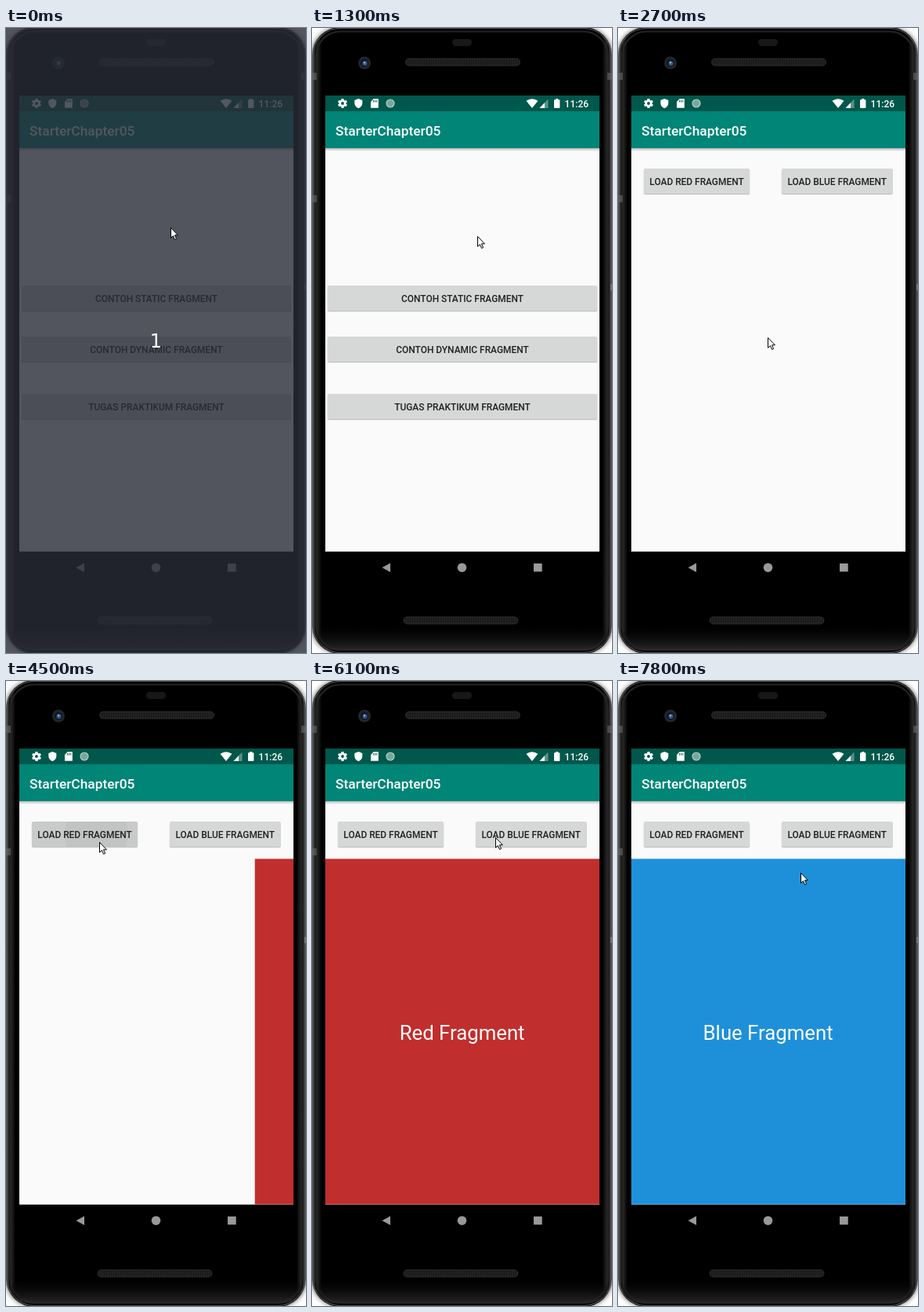
Animation of 383x796 px, one loop 8 s. Source, as an HTML page:

```html
<!DOCTYPE html>
<html lang="id">
<head>
<meta charset="utf-8">
<title>Fragment demo</title>
<style>
  html, body { margin: 0; width: 100%; height: 100%; overflow: hidden; background: #fff; }
  svg { display: block; width: 383px; height: 796px; font-family: Roboto, sans-serif; }
  text { white-space: pre; }
  .label { font-size: 11.92px; font-weight: 500; fill: #212121; text-anchor: middle; }
  .big { font-size: 25.75px; fill: #fff; text-anchor: middle; }
  .title { font-size: 17.35px; font-weight: 500; fill: #fff; }
  .clock { font-size: 12px; font-weight: 500; fill: #fff; }
  .count { font: 24px "DejaVu Sans", sans-serif; fill: #fff; text-anchor: middle; }
</style>
</head>
<body>
<svg id="stage" viewBox="0 0 383 796">
  <defs>
    <linearGradient id="rim">
      <stop offset="0" stop-color="#6a6a6a"/>
      <stop offset=".006" stop-color="#3a3a3a"/>
      <stop offset=".012" stop-color="#121212"/>
      <stop offset=".018" stop-color="#242424"/>
      <stop offset=".032" stop-color="#000"/>
      <stop offset=".968" stop-color="#000"/>
      <stop offset=".982" stop-color="#242424"/>
      <stop offset=".988" stop-color="#121212"/>
      <stop offset=".994" stop-color="#3a3a3a"/>
      <stop offset="1" stop-color="#6a6a6a"/>
    </linearGradient>
    <linearGradient id="foot" x2="0" y2="1">
      <stop offset="0" stop-color="#000" stop-opacity="0"/>
      <stop offset="1" stop-color="#2a2a2a"/>
    </linearGradient>
    <linearGradient id="shade" x2="0" y2="1">
      <stop offset="0" stop-opacity=".28"/>
      <stop offset="1" stop-opacity="0"/>
    </linearGradient>
    <filter id="soft"><feGaussianBlur stdDeviation="3"/></filter>
    <pattern id="mesh" width="3" height="3" patternUnits="userSpaceOnUse">
      <rect width="3" height="3" fill="#191919"/>
      <circle cx="1" cy="1" r=".7" fill="#383838"/>
    </pattern>
    <clipPath id="screen"><rect x="17" y="86" width="350" height="625"/></clipPath>
    <clipPath id="pane"><rect x="17" y="226.3" width="350" height="440.5"/></clipPath>
    <clipPath id="press"><rect id="pressBox" rx="2" height="32"/></clipPath>
  </defs>
  <g id="phone"></g>
  <g clip-path="url(#screen)">
    <g id="home"></g>
    <rect id="dim" x="17" y="86" width="350" height="625"/>
    <g id="loader"></g>
  </g>
  <g id="bars"></g>
  <g id="intro">
    <rect width="383" height="796" fill="#282c36" opacity=".8"/>
    <text class="count" x="191.5" y="407">1</text>
  </g>
  <path id="cursor" d="M.5 .5V13.3L3.4 10.6L5.6 15.5L7.6 14.6L5.5 9.8H9.4Z" fill="#fff" stroke="#000" stroke-linejoin="round"/>
</svg>
<script>
const LOOP = 8000, STEP = 100;
const $ = id => document.getElementById(id);
const set = (id, attrs) => {
  for (const key in attrs) $(id).setAttribute(key, attrs[key]);
};
const show = (id, on) => set(id, { display: on ? 'inline' : 'none' });
const rect = (x, y, w, h, fill, more = '') =>
  `<rect x="${x}" y="${y}" width="${w}" height="${h}" fill="${fill}" ${more}/>`;
const text = (kind, x, y, words) => `<text class="${kind}" x="${x}" y="${y}">${words}</text>`;

// Button face, shadow and press layer; the label goes on top.
function button(x, y, w, words, press = '') {
  return rect(x - .5, y + .5, w + 1, 33, '#000', 'rx="2.5" opacity=".09"') +
    rect(x, y + 1, w, 32, '#000', 'rx="2" opacity=".16"') +
    rect(x, y, w, 32, '#d6d7d7', 'rx="2"') +
    press + text('label', x + w / 2, y + 20.7, words);
}

function appWindow(body) {
  return rect(17, 86, 350, 625, '#000') + rect(17, 86, 350, 580.8, '#fafafa') +
    rect(17, 86, 350, 20, '#00574b') + rect(17, 106, 350, 47, '#008577') +
    rect(17, 153, 350, 4, 'url(#shade)') + text('title', 30, 136.6, 'StarterChapter05') + body;
}

const pressLayer = id => `<g id="${id}"></g>`;
const fragment = (id, fill, words) =>
  `<g id="${id}">${rect(17, 226.3, 350, 440.5, fill)}${text('big', 191.6, 456.7, words)}</g>`;

function phone() {
  const speaker = (x, y) => rect(x, y, 146, 9, 'url(#mesh)', 'rx="4.5" stroke="#2c2c2c"');
  const band = (x, y) => rect(x, y, 6, 9, '#6a6a6a', 'opacity=".6"');
  return rect(0, 0, 383, 796, '#fff') +
    rect(0, 0, 383, 796, '#555', 'rx="34" filter="url(#soft)"') +
    rect(0, -1, 383, 798, 'url(#rim)', 'rx="36"') +
    rect(1, .5, 381, 795, 'none', 'rx="35" stroke="#505050" stroke-width="1.2"') +
    rect(5.5, 4.5, 372, 787, 'none', 'rx="31" stroke="#242424" stroke-width="2"') +
    rect(6, 758, 371, 35, 'url(#foot)', 'rx="30"') +
    band(0, 57) + band(377, 57) + band(0, 213) + rect(381, 326, 2, 8, '#777') +
    rect(179, 14, 25, 9, '#181818', 'rx="4.5"') +
    '<circle cx="67" cy="44.5" r="8" fill="#242529"/><circle cx="67" cy="44.5" r="5" fill="#0f1724"/>' +
    '<circle cx="67.5" cy="45" r="3" fill="#33598f"/><circle cx="67" cy="44" r="1.2" fill="#8fabd0"/>' +
    speaker(119.5, 39) + speaker(117, 750);
}

function gear() {
  let teeth = '';
  for (let a = 0; a < 180; a += 60)
    teeth += rect(37.4, 90, 3.2, 12, '#fff', `rx=".6" transform="rotate(${a} 39 96)"`);
  return teeth + '<circle cx="39" cy="96" r="3.2" fill="none" stroke="#fff" stroke-width="2.6"/>' +
    '<circle cx="39" cy="96" r="1.9" fill="#00574b"/>';
}

function bars() {
  return gear() +
    '<path fill="#fff" d="M59.3 90L64.3 92V95.5C64.3 99 62 101.3 59.3 102.2C56.6 101.3 54.3 99 54.3 95.5V92Z"/>' +
    '<path fill="#fff" d="M78.5 90.3H84.8V101.8H75V94Z"/>' +
    '<path stroke="#00574b" d="M78.5 92V94.5M80.6 92V94.5M82.7 92V94.5"/>' +
    '<circle cx="100" cy="96" r="5" fill="#79a69e" stroke="#b5cfca" stroke-width="1.2"/>' +
    '<path fill="#fff" d="M273.5 92.7Q281 87.7 288.5 92.7L281 102Z"/>' +
    '<path fill="#fff" opacity=".35" d="M301.5 90.5V102H290.5Z"/>' +
    '<path fill="#fff" d="M297 95.2V102H290.5Z"/>' +
    rect(309, 91.2, 7.4, 10.8, '#fff', 'rx=".8"') + rect(311.2, 90, 3, 2, '#fff') +
    text('clock', 322.6, 100.6, '11:26') +
    '<g fill="#999"><path d="M89.5 687.2L100 681.4V693Z"/><circle cx="191.5" cy="687.2" r="5.8"/></g>' +
    rect(283, 682, 10.7, 10.4, '#999');
}

$('phone').innerHTML = phone();
$('home').innerHTML = appWindow(
  button(20, 328, 344, 'CONTOH STATIC FRAGMENT') +
  button(20, 393, 344, 'CONTOH DYNAMIC FRAGMENT', pressLayer('pressOpen')) +
  button(20, 466, 344, 'TUGAS PRAKTIKUM FRAGMENT'));
$('loader').innerHTML = appWindow(
  button(33, 179, 135, 'LOAD RED FRAGMENT', pressLayer('pressRed')) +
  button(209, 179, 141.5, 'LOAD BLUE FRAGMENT', pressLayer('pressBlue')) +
  '<g clip-path="url(#pane)">' + fragment('blue', '#1e90da', 'Blue Fragment') +
  fragment('red', '#c12e2e', 'Red Fragment') + '</g>');
$('bars').innerHTML = bars();

const presses = [
  { id: 'pressOpen', at: 2100, span: 400, x: 20, y: 393, w: 344, cx: 192 },
  { id: 'pressRed', at: 4500, span: 500, x: 33, y: 179, w: 135, cx: 115.5 },
  { id: 'pressBlue', at: 6600, span: 200, x: 209, y: 179, w: 141.5, cx: 248.5 }
];

// Pointer stops: time, x, y
const stops = [
  [0, 210, 254], [200, 210, 254], [300, 210, 257], [1200, 210, 257], [1300, 211, 265],
  [1700, 193, 406], [2000, 193, 406], [2100, 191, 394], [2900, 191, 394], [3600, 119, 205],
  [5500, 119, 205], [6100, 234, 199], [7500, 234, 199], [7800, 233, 244], [LOOP, 233, 244]
];

const clamp = p => Math.min(1, Math.max(0, p));
const ease = p => (1 - Math.cos(Math.PI * clamp(p))) / 2;

function pointer(t) {
  const i = stops.findIndex(s => s[0] > t);
  const [t0, x0, y0] = stops[i - 1], [t1, x1, y1] = stops[i];
  const p = ease((t - t0) / (t1 - t0));
  return [Math.round(x0 + (x1 - x0) * p), Math.round(y0 + (y1 - y0) * p)];
}

function drawPress(t) {
  for (const b of presses) {
    const age = t - b.at, on = age >= 0 && age < b.span;
    show(b.id, on);
    if (!on) continue;
    set('pressBox', { x: b.x, y: b.y, width: b.w });
    set(b.id, { 'clip-path': 'url(#press)', opacity: 1 - age / b.span });
    $(b.id).innerHTML = rect(b.x, b.y, b.w, 32, '#000', 'opacity=".06"') +
      `<circle cx="${b.cx}" cy="${b.y + 16}" r="${41 + age * .4}" opacity=".035"/>`;
  }
}

function drawOpening(t) {
  const age = t - 2200, done = t >= 2700;
  show('loader', age >= 0);
  show('home', !done);
  show('dim', age >= 0 && !done);
  set('dim', { opacity: .3 * clamp((age + 50) / 250) });
  const drop = done ? 0 : 31 * Math.exp(-Math.min(age, 200) / 110);
  set('loader', { transform: `translate(0 ${drop.toFixed(1)})`, opacity: clamp(.45 + age / 220) });
}

function drawFragments(t) {
  const leaving = t >= 6600;
  show('red', t >= 4500 && t < 6700);
  show('blue', leaving);
  const slide = 350 * (1 - ease((t - 4402) / 400));
  set('red', {
    transform: leaving ? 'translate(192 446.5) scale(.976) translate(-192 -446.5)' : `translate(${slide.toFixed(1)} 0)`,
    opacity: leaving ? .22 : 1
  });
  set('blue', { opacity: t < 6700 ? .77 : 1 });
}

function draw(time) {
  const t = Math.floor((time % LOOP) / STEP) * STEP;
  show('intro', t < 300);
  drawPress(t);
  drawOpening(t);
  drawFragments(t);
  set('cursor', { transform: `translate(${pointer(t).join(' ')})` });
}

let start;
function tick(now) {
  start ??= now;
  draw(now - start);
  requestAnimationFrame(tick);
}
draw(0);
requestAnimationFrame(tick);
</script>
</body>
</html>
```
